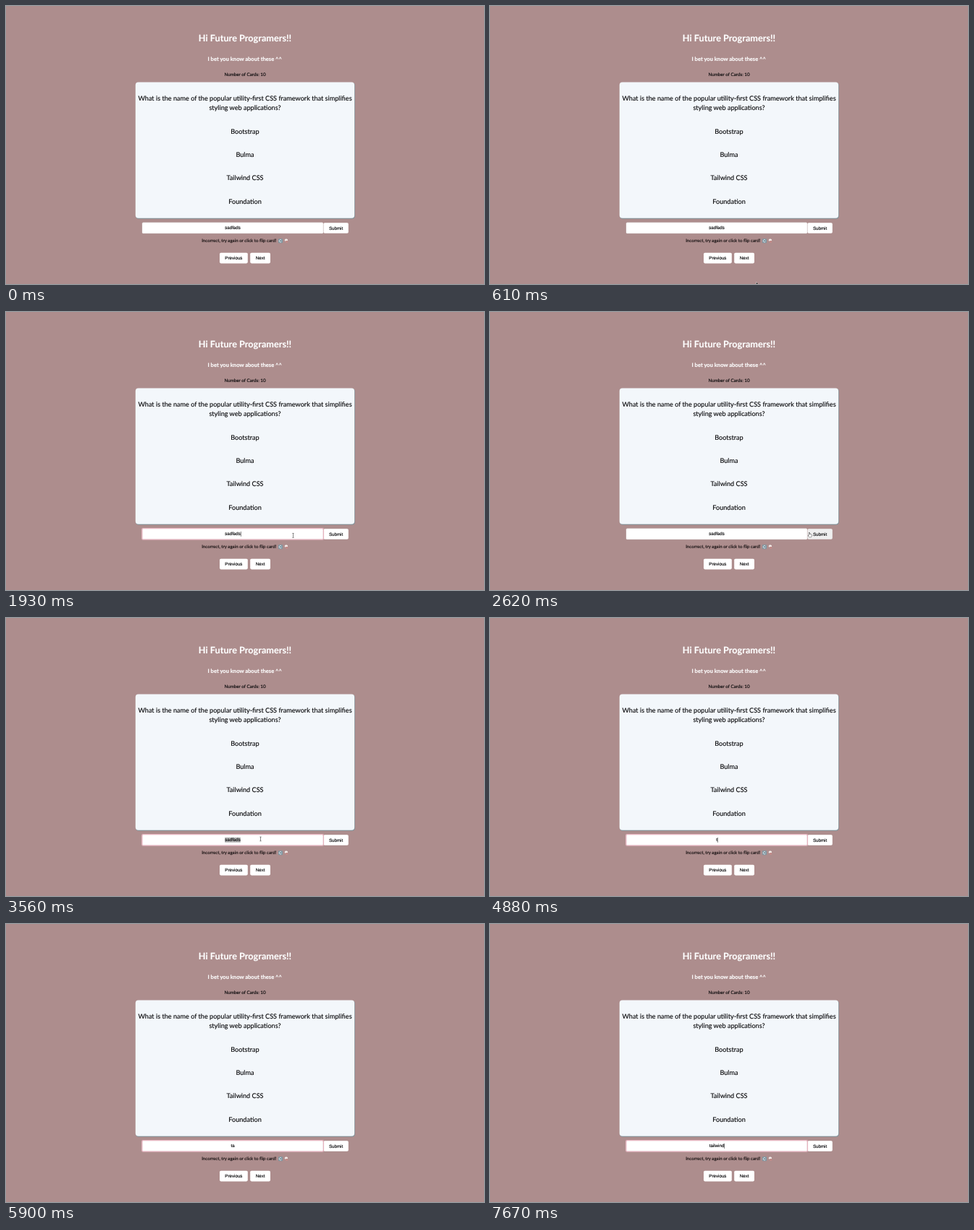
Animation of 660x385 px, one loop 8000 ms. Source, as an HTML page with a canvas:

```html
<!DOCTYPE html>
<html lang="en">
<head>
<meta charset="utf-8">
<title>Flashcards</title>
<style>
  html, body { margin: 0; width: 100%; height: 100%; overflow: hidden; background: #ad8d8d; }
  canvas { display: block; width: 660px; height: 385px; }
</style>
</head>
<body>
<canvas id="stage"></canvas>
<script>
const W = 660, H = 385, LOOP = 8000;
const SANS = 'Lato, "Open Sans", sans-serif';
const UI = '"Liberation Sans", Arial, sans-serif';

const canvas = document.getElementById('stage');
const ctx = canvas.getContext('2d');
const dpr = window.devicePixelRatio || 1;
canvas.width = W * dpr;
canvas.height = H * dpr;

// Field states: start time, text, flags
const states = [
  { at: 0, text: 'sadfads' },
  { at: 1100, text: 'sadfads', focus: true, caret: true },
  { at: 2250, text: 'sadfads' },
  { at: 3390, text: 'sadfads', focus: true, caret: true },
  { at: 3560, text: 'sadfads', focus: true, selected: true },
  { at: 4420, text: '', focus: true, caret: true },
  { at: 4880, text: 't', focus: true, caret: true },
  { at: 5040, text: 'ta', focus: true, caret: true },
  { at: 5200, text: 'tau', focus: true, caret: true },
  { at: 5380, text: 'ta', focus: true, caret: true },
  { at: 5900, text: 'ta', focus: true },
  { at: 6340, text: 'tai', focus: true, caret: true },
  { at: 6500, text: 'tail', focus: true, caret: true },
  { at: 6910, text: 'tailw', focus: true, caret: true },
  { at: 7050, text: 'tailwi', focus: true, caret: true },
  { at: 7260, text: 'tailwin', focus: true, caret: true },
  { at: 7670, text: 'tailwind', focus: true, caret: true }
];

// Pointer moves: start, end, from, to
const moves = [
  { t0: 530, t1: 1030, from: [372, 388], to: [311, 311] },
  { t0: 1450, t1: 2250, from: [311, 311], to: [442.5, 308.5] },
  { t0: 2590, t1: 3160, from: [442.5, 308.5], to: [351.5, 306] }
];
const POINTER_END = 4420;

const field = { x: 188, y: 299.8, w: 250, h: 15.2 };
const submit = { x: 438.3, y: 300.2, w: 34.5, h: 14.6 };

const inside = (p, b) =>
  p[0] >= b.x && p[0] <= b.x + b.w && p[1] >= b.y && p[1] <= b.y + b.h;

function box(x, y, w, h, r, fill, stroke, line = 0.6) {
  ctx.beginPath();
  ctx.roundRect(x, y, w, h, r);
  if (fill) { ctx.fillStyle = fill; ctx.fill(); }
  if (stroke) { ctx.strokeStyle = stroke; ctx.lineWidth = line; ctx.stroke(); }
}

// A hairline stroke gives the glyphs a slightly heavier weight
function label(text, x, y, font, color = '#08080a', align = 'center') {
  ctx.font = font;
  ctx.fillStyle = ctx.strokeStyle = color;
  ctx.lineWidth = 0.14;
  ctx.textAlign = align;
  ctx.fillText(text, x, y);
  ctx.strokeText(text, x, y);
}

function path(points, fill, stroke, line) {
  ctx.beginPath();
  points.forEach(([x, y]) => ctx.lineTo(x, y));
  ctx.closePath();
  ctx.lineJoin = 'round';
  ctx.lineWidth = line;
  ctx.strokeStyle = stroke;
  ctx.stroke();
  ctx.fillStyle = fill;
  ctx.fill();
}

const ease = k => k * k * (3 - 2 * k);

function pointerAt(t) {
  if (t < moves[0].t0 || t >= POINTER_END) return null;
  const m = moves.filter(v => t >= v.t0).pop();
  const e = ease(Math.min(1, (t - m.t0) / (m.t1 - m.t0)));
  return m.from.map((v, i) => v + (m.to[i] - v) * e);
}

function drawHeader() {
  label('Hi Future Programers!!', 330, 49, `bold 12.7px ${SANS}`, '#fff');
  label('I bet you know about these ^^', 329.7, 75.5, `bold 7.6px ${SANS}`, '#fff');
  label('Number of Cards: 10', 330, 97.2, `6.25px ${SANS}`);
}

function drawCard() {
  box(179.2, 106, 302.6, 188.7, 4, '#80949b');
  box(178.8, 105.4, 302.3, 188.4, 4, '#f3f7fb');
  const font = `9.12px ${SANS}`;
  label('What is the name of the popular utility-first CSS framework that simplifies', 330, 131.4, font);
  label('styling web applications?', 330, 144, font);
  ['Bootstrap', 'Bulma', 'Tailwind CSS', 'Foundation'].forEach((name, i) =>
    label(name, 330, 176.7 + i * 32.35, font));
}

function drawField(s) {
  const { x, y, w, h } = field;
  box(x, y, w, h, 1.5, '#fff', '#cdbfbf', 0.4);
  if (s.focus) box(x - 0.2, y - 0.2, w + 0.6, h + 0.4, 1.5, null, '#e6b3bf', 1.3);
  ctx.font = `6.2px ${UI}`;
  const half = ctx.measureText(s.text).width / 2;
  const mid = x + w / 2;
  if (s.selected) {
    ctx.fillStyle = '#bdbdbd';
    ctx.fillRect(mid - half, 303.7, half * 2, 7.3);
  }
  label(s.text, mid, 309.4, ctx.font);
  if (s.caret) {
    ctx.fillStyle = '#333';
    ctx.fillRect(mid + half + 0.1, 304, 0.6, 7);
  }
}

function button(text, b, fill = '#fff') {
  box(b.x, b.y, b.w, b.h, 1.8, fill);
  label(text, b.x + b.w / 2, b.y + b.h / 2 + 2.1, `6.2px ${UI}`);
}

function drawMessage() {
  label('Incorrect, try again or click to flip card!', 270.2, 327.4, `6.15px ${SANS}`, '#100c0d', 'left');
  box(376, 322.3, 6, 6, 1.1, '#7d95a0');
  ctx.strokeStyle = '#edf2f4';
  ctx.lineWidth = 0.9;
  ctx.beginPath();
  ctx.arc(379, 325.3, 1.7, 0.5, 5.6);
  ctx.stroke();
  box(384.8, 322.6, 4.2, 3.2, 1.5, '#f2e9e6');
  box(386, 325, 3.2, 3, 0.8, '#c08a88');
}

function drawBeam(x, y) {
  ctx.fillStyle = '#555';
  ctx.fillRect(x - 0.35, y - 3, 0.7, 6);
  ctx.fillRect(x - 1.2, y - 3.2, 2.4, 0.6);
  ctx.fillRect(x - 1.2, y + 2.6, 2.4, 0.6);
}

function drawHand(x, y) {
  path([[-1.3, -2.8], [-0.4, -2.8], [-0.3, -0.8], [2, -0.3], [2.3, 1.3],
    [1.6, 3.2], [-0.9, 3.2], [-2.3, 0.9], [-1.2, 0.8]]
    .map(([a, b]) => [x + a, y + b]), '#fff', '#222', 1);
}

function drawArrow(x, y) {
  path([[0, 0], [0, 7], [1.6, 5.5], [2.7, 8], [3.7, 7.5], [2.6, 5.1], [4.8, 5]]
    .map(([a, b]) => [x + a, y + b]), '#111', '#fff', 0.9);
}

function render(t) {
  const state = states.filter(s => t >= s.at).pop();
  const p = pointerAt(t);
  const overSubmit = p && inside(p, submit);

  ctx.setTransform(dpr, 0, 0, dpr, 0, 0);
  ctx.textRendering = 'geometricPrecision';
  ctx.fillStyle = '#ad8d8d';
  ctx.fillRect(0, 0, W, H);

  drawHeader();
  drawCard();
  button('Submit', submit, overSubmit ? '#efefef' : '#fff');
  drawField(state);
  drawMessage();
  button('Previous', { x: 295, y: 341.8, w: 38.8, h: 14.6 });
  button('Next', { x: 337.2, y: 341.8, w: 27.8, h: 14.6 });

  if (!p) return;
  const draw = overSubmit ? drawHand : inside(p, field) ? drawBeam : drawArrow;
  draw(p[0], p[1]);
}

const start = performance.now();
function tick() {
  render((performance.now() - start) % LOOP);
  requestAnimationFrame(tick);
}
tick();
</script>
</body>
</html>
```
